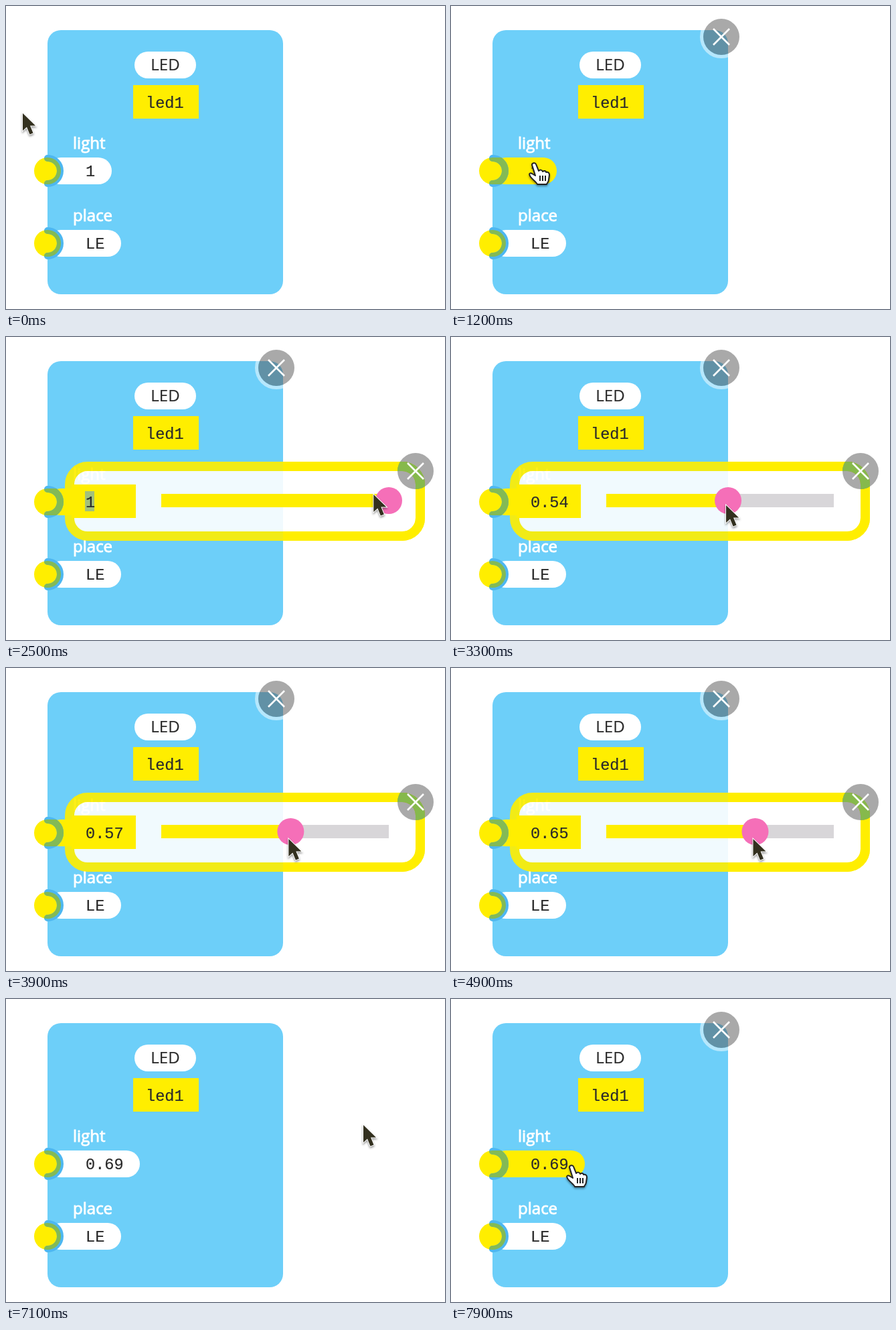
Animation, 656 px wide and 452 px high, one loop 8000 ms. Source, as an HTML page:

```html
<!DOCTYPE html>
<html>
<head>
<meta charset="utf-8">
<style>
  html, body { margin: 0; width: 100%; height: 100%; overflow: hidden; background: #fff; }
  svg { display: block; }
  text { font: 24px "Open Sans", sans-serif; fill: #2b2b2b; stroke: #2b2b2b; stroke-width: .2; }
  .mono { font: 23.6px "Liberation Mono", monospace; }
  .label { fill: #fff; stroke: #fff; stroke-width: .9; }
  .yellow { fill: #fe0; }
  .arc { fill: none; stroke-width: 10; stroke-linecap: round; }
  .ink { stroke: #222; stroke-width: 2; stroke-linejoin: round; }
  #cursor { filter: drop-shadow(0 2px 1.5px rgba(0, 0, 0, .4)); }
</style>
</head>
<body>
<svg width="656" height="452" viewBox="0 0 656 452">
  <defs>
    <clipPath id="portClip">
      <circle r="20"/>
      <rect id="pillClip" y="-20" width="0" height="40"/>
    </clipPath>
    <clipPath id="dotClip"><circle r="20"/></clipPath>
    <clipPath id="closeClip"><circle cx="612" cy="200" r="27"/></clipPath>
    <clipPath id="offCard"><rect x="414" width="242" height="452"/></clipPath>
    <path id="arc" class="arc" d="M0-19A19 19 0 0 1 0 19"/>
    <path id="cross" d="M-12-12L12 12M12-12L-12 12" stroke="#fff" stroke-width="2.6"/>
    <rect id="frame" x="95" y="193" width="524" height="104" rx="27" stroke-width="14"/>
  </defs>

  <rect x="62" y="36" width="352" height="394" rx="20" fill="#6dcff9"/>
  <rect x="192" y="68" width="92" height="40" rx="20" fill="#fff"/>
  <text x="238" y="96" text-anchor="middle">LED</text>
  <rect class="yellow" x="190" y="118" width="98" height="50"/>
  <text class="mono" x="209" y="152">led1</text>

  <text class="label" x="100" y="213">light</text>
  <rect id="pill" x="62" y="226" height="40" rx="20"/>
  <text id="pillText" class="mono" x="119" y="254"></text>
  <g transform="translate(62 246)">
    <circle class="yellow" r="20"/>
    <use href="#arc" stroke="#4db7f1"/>
    <g clip-path="url(#portClip)"><use href="#arc" stroke="#83ba55"/></g>
  </g>

  <text class="label" x="100" y="321">place</text>
  <rect x="62" y="334" width="110" height="40" rx="20" fill="#fff"/>
  <text class="mono" x="119" y="362">LE</text>
  <g transform="translate(62 354)">
    <circle class="yellow" r="20"/>
    <use href="#arc" stroke="#4db7f1"/>
    <g clip-path="url(#dotClip)"><use href="#arc" stroke="#83ba55"/></g>
  </g>

  <g id="cardClose" transform="translate(404 46)">
    <circle r="29.5" fill="none" stroke="#fff" stroke-opacity=".5" stroke-width="5"/>
    <circle r="27" fill="#565656" fill-opacity=".51"/>
    <use href="#cross"/>
  </g>

  <g id="panel">
    <g opacity=".91"><use href="#frame" fill="#fff" stroke="#fe0"/></g>
    <g clip-path="url(#offCard)"><use href="#frame" fill="none" stroke="#fe0"/></g>
    <rect class="yellow" x="98" y="220" width="96" height="50"/>
    <rect id="selection" x="118" y="230" width="14" height="30" fill="#a3c17b"/>
    <text id="value" class="mono" x="119" y="254"></text>
    <rect x="232" y="234" width="340" height="20" fill="#d8d6d9"/>
    <rect id="fill" class="yellow" x="232" y="234" height="20"/>
    <circle id="knob" cy="244" r="20" fill="#f56fb8"/>
    <circle id="closeRing" cx="612" cy="200" r="30" fill="#fff"/>
    <circle id="closeDot" cx="612" cy="200" r="27"/>
    <g id="overlap" clip-path="url(#closeClip)"><use href="#frame" fill="none" stroke="#86b94c"/></g>
    <use href="#cross" x="612" y="200"/>
  </g>

  <g id="cursor">
    <path id="arrow" d="M0 0V26L6 20.5L10.5 31.5L15.5 29.5L11 18.5H19Z" fill="#33301f" stroke="#fff" stroke-width="2" paint-order="stroke"/>
    <g id="hand" class="ink">
      <path fill="#fff" d="M-4 2C-4-1 1-2 2 1L6 11C8 9 11 9 12 12C14 10 17 11 17 13C20 12 22 14 22 17L21 24C21 28 18 29 18 31H4C3 28-2 25-6 20C-9 16-8 13-4 15L1 18Z"/>
      <path d="M8 18V26M12 18V26M16 18V26"/>
    </g>
  </g>
</svg>
<script>
const $ = id => document.getElementById(id);
const set = (id, attrs) => { for (const k in attrs) $(id).setAttribute(k, attrs[k]); };
const show = (id, on) => { $(id).style.display = on ? '' : 'none'; };
const clamp = n => Math.max(0, Math.min(1, n));
const smooth = u => u * u * (3 - 2 * u);

const OPEN = 1600, DRAG = 2800, DROP = 5100, PRESS = 6100, CLOSED = 6300, LEAVE = 7100;

// Pointer moves: from, until, to x, to y
const moves = [
  [700, 1200, 125, 235],
  [1950, 2580, 569, 235],
  [DRAG, 3500, 372, 255],
  [3500, 4100, 440, 255],
  [4700, DROP, 463, 255],
  [5200, 5700, 611, 190],
  [7000, LEAVE, 534, 188],
  [LEAVE, 7900, 181, 249]
];

function pointer(t) {
  return moves.reduce(([x, y], [from, until, toX, toY]) => {
    const k = smooth(clamp((t - from) / (until - from)));
    return [x + (toX - x) * k, y + (toY - y) * k];
  }, [25, 160]);
}

function draw(t) {
  const [x, y] = pointer(t);
  const open = t >= OPEN && t < CLOSED;

  // The slider follows the pointer while it is dragged.
  const v = t < DRAG ? 1 : clamp((pointer(Math.min(t, DROP))[0] + 3 - 232) / 340);
  const text = String(+v.toFixed(2));

  const pillText = t >= PRESS ? text : '1';
  const right = 144 + 14 * pillText.length;
  const overPill = !open && x > 62 && x < right && y > 220 && y < 266;
  const hot = open || overPill;
  set('pill', { width: right - 62, fill: hot ? '#fe0' : '#fff' });
  set('pillClip', { width: hot ? 26 : 0 });
  $('pillText').textContent = pillText;
  show('cardClose', t < LEAVE ? x > 62 : x < 414);

  show('panel', open);
  set('panel', { opacity: Math.min(clamp((t - OPEN + 100) / 400), clamp((CLOSED - t) / 200)) });
  show('selection', t < DRAG);
  $('value').textContent = text;
  set('fill', { width: 340 * v });
  set('knob', { cx: 232 + 340 * v });

  const overClose = open && Math.hypot(x - 612, y - 200) < 27;
  set('closeDot', { fill: overClose ? '#f56fb8' : '#565656', 'fill-opacity': overClose ? 1 : .51 });
  show('closeRing', overClose);
  show('overlap', !overClose);

  const pointing = overPill || overClose || (open && t < OPEN + 300);
  show('hand', pointing);
  show('arrow', !pointing);
  set('cursor', { transform: `translate(${x} ${y})` });
}

const start = performance.now();
function tick() {
  const t = (performance.now() - start) % 8000;
  draw(Math.floor(t / 100) * 100);
  requestAnimationFrame(tick);
}
tick();
</script>
</body>
</html>
```
